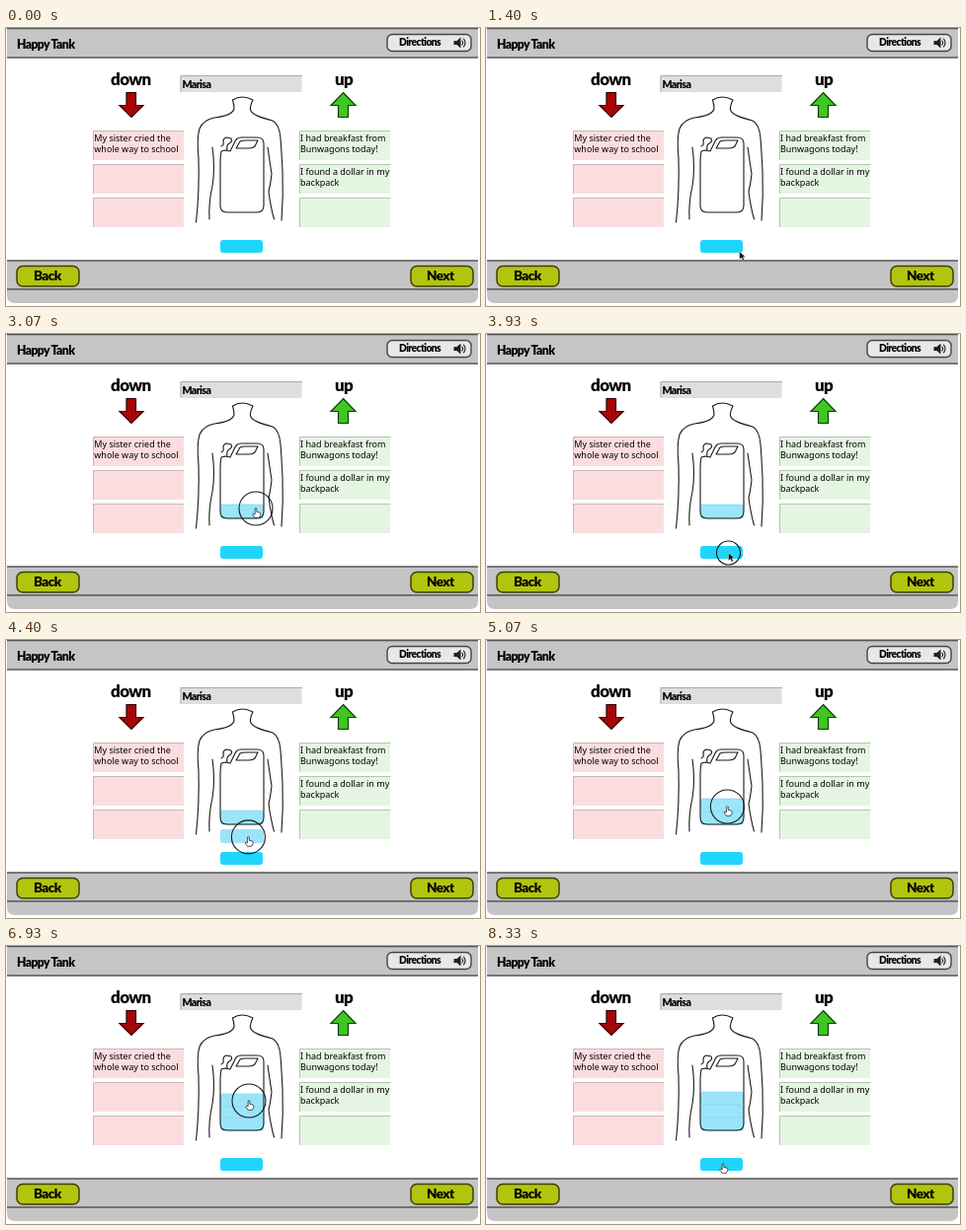
Write an HTML page that moves like this. It is 480 by 282 pixels and loops after 8.39 s.

```html
<!DOCTYPE html>
<html lang="en">
<head>
<meta charset="utf-8">
<title>Happy Tank</title>
<style>
html, body { margin: 0; width: 100%; height: 100%; overflow: hidden; background: #fff; }
svg { display: block; }
text { font: 9px "Noto Sans", "Open Sans", sans-serif; fill: #000; }
.hand { font-family: Lato, sans-serif; font-weight: 900; letter-spacing: -.6px; }
.line { fill: none; stroke: #1a1a1a; stroke-width: 1.1; stroke-linecap: round; stroke-linejoin: round; }
.edge { stroke: #555; stroke-width: 1.3; }
.button { fill: #b2c40e; stroke: #3b400c; stroke-width: 1.5; }
</style>
</head>
<body>
<svg width="480" height="282" viewBox="0 0 480 282">
  <rect width="480" height="282" fill="#fff"/>
  <path d="M1 0H478V30H1Z" fill="#c5c5c5"/>
  <path class="edge" d="M1 .5H478M1 30H478"/>
  <path d="M1 236H478V271Q478 279 470 279H9Q1 279 1 271Z" fill="#c4c4c4"/>
  <path class="edge" d="M1 236H478M1 265H478"/>

  <rect x="386" y="6.500" width="85" height="17" rx="5" fill="#e8e8e8" stroke="#444" stroke-width="1.4"/>
  <path d="M453.500 13h3l4-3.500v11l-4-3.500h-3z" fill="#222"/>
  <path class="line" d="M462 13q1.500 2 0 4M463.500 11q3 4 0 8"/>
  <rect class="button" x="11" y="241.500" width="63" height="20.500" rx="6"/>
  <rect class="button" x="410" y="241.500" width="63" height="20.500" rx="6"/>

  <g id="boxes"></g>

  <g stroke-width="1.2">
    <path d="M122 65.500h9.500v13h7.500l-12 12-12-12h7z" fill="#a50606" stroke="#300"/>
    <path d="M341.500 65.500l12.500 13h-7.500v12h-10v-12h-7.500z" fill="#3fc621" stroke="#123d0a"/>
  </g>

  <rect x="217" y="215" width="43" height="13" rx="3" fill="#20d5fc"/>
  <g id="bars"></g>

  <path class="line" d="M229.500 73Q239 67 250 73M229.500 73Q231 78 231 82Q229 89 211 91Q200 93 196 102Q193 112 195 132Q196 165 192.500 197M250 73Q247 79 247.500 83Q249 89 270 94Q277 98 278 112Q279 125 280 145Q281 170 279 195"/>
  <path class="line" d="M209 121Q212 142 209 160Q205 178 206 194M265 121Q267 135 269 148Q268 158 266 166Q268 182 271.500 194"/>
  <path class="line" d="M218 125Q217 130 217 136V180Q217 187 224 187H254Q261 187 261 180V117Q261 111 254 111H238Q233 111 231 117L227 125L222 124L218 125"/>
  <path class="line" d="M218 120Q221 119 220 115Q220 112 223 111L228 112Q230 115 226 117Q223 119 224 124M233 122L237 115Q239 114 243 114H255L252 120Q250 122 246 122Z"/>

  <g id="labels"></g>

  <circle id="ring" class="line"/>
  <g id="cursor">
    <path id="arrow" d="M0 0v8l2-1.700 1.500 3 1.500-.7-1.500-3h2.700z" fill="#111" stroke="#fff" stroke-width=".4"/>
    <path id="pointer" transform="scale(.85)" d="M-1 0Q0-1 1 0V4L5 5Q6 6 5.500 8L4 11H-1L-4 7Q-3 5-1 7Z" fill="#fff" stroke="#222" stroke-width=".9"/>
  </g>
</svg>
<script>
const LOOP = 8390, STEP = LOOP / 126;
const byId = id => document.getElementById(id);

function add(parent, tag, attrs, content = "") {
  const node = document.createElementNS("http://www.w3.org/2000/svg", tag);
  for (const name in attrs) node.setAttribute(name, attrs[name]);
  node.textContent = content;
  byId(parent).append(node);
  return node;
}

function box(x, y, width, height, fill, edge) {
  add("boxes", "rect", { x, y, width, height, fill });
  add("boxes", "path", { d: `M${x + .5} ${y + height}v${.5 - height}h${width}`, fill: "none", stroke: edge });
}
box(176.5, 48, 123, 17, "#dedede", "#aaa");
for (const y of [104, 138, 172]) {
  box(88, y, 92, 30, "#fbdde0", "#c8b6b8");
  box(297, y, 92, 30, "#e4f5e1", "#b6c4b3");
}

const write = (x, y, words) => add("labels", "text", { x, y }, words);
const scrawl = (x, y, size, words) =>
  add("labels", "text", { x, y, class: "hand", style: `font-size:${size}px` }, words);
scrawl(11, 21, 12.2, "Happy Tank");
scrawl(398, 18, 10.3, "Directions");
scrawl(106, 58, 17, "down");
scrawl(333, 58, 17, "up");
scrawl(178.5, 61, 10.5, "Marisa");
scrawl(28, 256, 13.5, "Back");
scrawl(426, 256, 13.5, "Next");
write(89.3, 115, "My sister cried the");
write(89.3, 126, "whole way to school");
write(298, 115, "I had breakfast from");
write(298, 126, "Bunwagons today!");
write(298, 149, "I found a dollar in my");
write(298, 160, "backpack");

// Each key is [time, ...values]
const cursorPath = [
  [530, 334, 278], [870, 334, 278], [1530, 248, 221], [1800, 246, 221], [2000, 251, 221],
  [2270, 253, 221], [2470, 256, 201], [2870, 253, 177], [3070, 253, 177], [3730, 246, 222],
  [4130, 245, 222], [4730, 246, 169], [5200, 244, 169], [5600, 244, 219], [6130, 243, 220],
  [6530, 243, 220], [6930, 246, 157], [7400, 246, 156], [8200, 240, 221]
];
const drags = [
  { press: 1800, release: 3070, path: [[2270, 215], [2470, 198], [2870, 173]], height: 14 },
  { press: 3930, release: 5200, path: [[4130, 215], [4730, 161]], height: 13 },
  { press: 6450, release: 7330, path: [[6530, 215], [6930, 150], [7130, 148]], height: 13 }
];
for (const drag of drags)
  drag.bar = add("bars", "rect", { x: 217.5, width: 43, height: drag.height, rx: 2, fill: "#9be5fb", stroke: "#7bd3ee", "stroke-width": .6 });

function sample(keys, time) {
  const next = keys.findIndex(key => key[0] > time);
  if (next < 0) return keys.at(-1).slice(1);
  if (next === 0) return keys[0].slice(1);
  const from = keys[next - 1], to = keys[next];
  const p = (time - from[0]) / (to[0] - from[0]);
  const eased = p * p * (3 - 2 * p);
  return from.slice(1).map((value, i) => value + (to[i + 1] - value) * eased);
}

const show = (node, visible) => node.setAttribute("visibility", visible ? "inherit" : "hidden");

function draw(now) {
  const time = Math.floor(now % LOOP / STEP + .05) * STEP + 2;
  const [x, y] = sample(cursorPath, time);
  const held = drags.find(drag => time >= drag.press && time < drag.release);
  for (const drag of drags) {
    show(drag.bar, time >= drag.path[0][0]);
    drag.bar.setAttribute("y", sample(drag.path, time)[0]);
  }
  const ring = byId("ring");
  show(ring, held);
  if (held) {
    ring.setAttribute("cx", x);
    ring.setAttribute("cy", y);
    ring.setAttribute("r", 12 + 5 * Math.min(1, (time - held.press) / 250));
  }
  const isArrow = time < 1500 || held && time - held.press < 130;
  show(byId("cursor"), time >= 530);
  show(byId("arrow"), isArrow);
  show(byId("pointer"), !isArrow);
  byId("cursor").setAttribute("transform", `translate(${x} ${y})`);
}

const start = performance.now();
function tick() {
  draw(performance.now() - start);
  requestAnimationFrame(tick);
}
tick();
</script>
</body>
</html>
```
